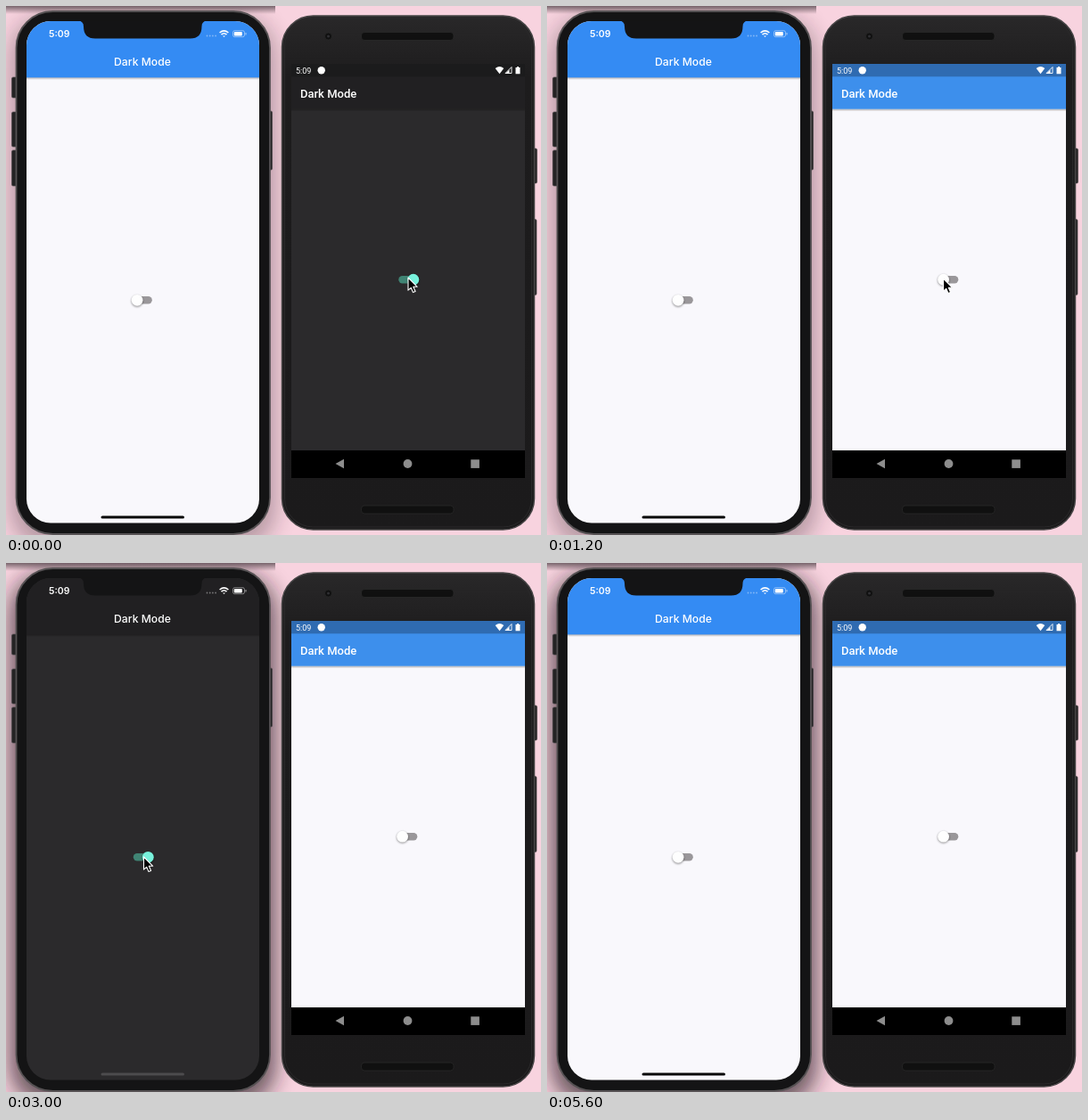
Recreate the animation shown at these times as an HTML page. Size 600 by 594 pixels, loop 5.65 s.

```html
<!DOCTYPE html>
<html>
<head>
<meta charset="utf-8">
<style>
html, body { margin: 0; width: 100%; height: 100%; overflow: hidden; background: #f8d3df; }
svg { display: block; width: 600px; height: 594px; }
.ios { font-family: Inter, Roboto, sans-serif; }
.droid { font-family: Roboto, sans-serif; }
text { fill: #fff; }
</style>
</head>
<body>
<svg viewBox="0 0 600 594">
  <defs>
    <filter id="blur" x="-30%" y="-20%" width="160%" height="140%"><feGaussianBlur stdDeviation="12"/></filter>
    <filter id="soft" x="-50%" y="-50%" width="200%" height="200%"><feGaussianBlur stdDeviation="1"/></filter>
    <linearGradient id="top" x2="0" y2="1">
      <stop stop-color="#4d3f45" stop-opacity=".75"/><stop offset="1" stop-color="#4d3f45" stop-opacity="0"/>
    </linearGradient>
    <linearGradient id="fall" x2="0" y2="1">
      <stop stop-opacity=".3"/><stop offset="1" stop-opacity="0"/>
    </linearGradient>
    <linearGradient id="shell" x2="0" y2="1">
      <stop stop-color="#292829"/><stop offset=".12" stop-color="#1d1c1d"/><stop offset="1" stop-color="#1b1a1b"/>
    </linearGradient>
    <clipPath id="leftScreen"><rect x="23" y="17" width="261" height="563.5" rx="27"/></clipPath>
  </defs>

  <rect width="600" height="594" fill="#f8d3df"/>
  <rect id="shadow" x="4" y="10" width="299" height="600" rx="46" fill="#24161c" filter="url(#blur)"/>
  <rect width="302" height="9" fill="url(#top)"/>

  <!-- left phone -->
  <g fill="#242324" stroke="#4a4648" stroke-width=".7">
    <rect x="6.5" y="80" width="7" height="23" rx="1.5"/>
    <rect x="6.5" y="119" width="7" height="39" rx="1.5"/>
    <rect x="6.5" y="162" width="7" height="40" rx="1.5"/>
    <rect x="292" y="118" width="6.5" height="66" rx="1.5"/>
  </g>
  <rect x="11.5" y="6" width="284.5" height="587" rx="41" fill="#141415" stroke="#565254" stroke-width="1.8"/>
  <g clip-path="url(#leftScreen)">
    <rect id="lBody" x="23" y="17" width="261" height="564"/>
    <rect x="23" y="80" width="261" height="3" fill="url(#fall)"/>
    <rect id="lBar" x="23" y="17" width="261" height="63.3"/>
  </g>
  <path d="M81 16.5Q87 17 87 23Q87 36.5 100 36.5H206.5Q219.5 36.5 219.5 23Q219.5 17 225.5 16.5Z" fill="#141415"/>
  <g class="ios">
    <text x="48" y="35" font-size="10.5" font-weight="600">5:09</text>
    <text x="153" y="67" font-size="12.2" font-weight="500" text-anchor="middle">Dark Mode</text>
  </g>
  <g fill="#fff" opacity=".38">
    <circle cx="225.5" cy="33.5" r=".9"/><circle cx="228.7" cy="33.5" r=".9"/>
    <circle cx="231.9" cy="33.5" r=".9"/><circle cx="235.1" cy="33.5" r=".9"/>
  </g>
  <g fill="none" stroke="#fff" stroke-width="1.6">
    <path d="M239.6 30Q244.5 25.6 249.4 30M241.5 32.1Q244.5 29.4 247.5 32.1"/>
    <path d="M243 33.4H246L244.5 35Z" fill="#fff" stroke="none"/>
    <rect x="254.5" y="27.7" width="13" height="7" rx="2" stroke-width=".8" opacity=".55"/>
    <rect x="255.8" y="29" width="9" height="4.4" rx="1" fill="#fff" stroke="none"/>
    <path d="M269 30V32.5" stroke-width="1.1" opacity=".55"/>
  </g>
  <rect id="home" x="106.5" y="572.4" width="93.5" height="3.2" rx="1.6"/>

  <!-- right phone -->
  <g fill="#282728" stroke="#3b393a" stroke-width=".6">
    <rect x="589" y="160" width="6.5" height="39" rx="1.5"/>
    <rect x="589" y="239.5" width="6" height="85" rx="1.5"/>
  </g>
  <rect x="309.5" y="11" width="283" height="577" rx="35" fill="url(#shell)" stroke="#474546" stroke-width="1.5"/>
  <rect x="312.5" y="14" width="277" height="571" rx="32" fill="none" stroke="#2a292a"/>
  <g fill="#101010" stroke="#2c2b2c" stroke-width=".7">
    <rect x="398.5" y="29.5" width="103.5" height="9" rx="3.5"/>
    <rect x="398.5" y="561" width="103.5" height="9" rx="3.5"/>
    <circle cx="361.5" cy="34" r="4"/>
  </g>
  <circle cx="361.5" cy="34" r="1.5" fill="#303033"/>
  <rect id="rBody" x="320" y="115" width="262" height="384"/>
  <rect x="320" y="115.5" width="262" height="3" fill="url(#fall)"/>
  <rect id="rBar" x="320" y="79" width="262" height="36.7"/>
  <rect id="rStatus" x="320" y="65" width="262" height="14.3"/>
  <g class="droid">
    <text x="325" y="75.8" font-size="9">5:09</text>
    <text x="330" y="102.5" font-size="13" font-weight="500">Dark Mode</text>
  </g>
  <g fill="#fff">
    <circle cx="353.7" cy="72.3" r="4.2"/>
    <path d="M548.7 70Q553.5 66.2 558.3 70L553.5 76.2Z"/>
    <path d="M560 75.5L567 68.5V75.5Z" fill="none" stroke="#fff" stroke-width=".9"/>
    <path d="M560 76L564.5 71.5V76Z"/>
    <path d="M571.5 69H573V68H575V69H576.5V76.3H571.5Z"/>
  </g>
  <rect x="320" y="499" width="262" height="31"/>
  <g fill="#8d8d8d">
    <path d="M369.5 514L379 508.8V519.2Z"/>
    <circle cx="450.5" cy="514" r="4.9"/>
    <rect x="521.3" y="509.3" width="9.6" height="9.6"/>
  </g>

  <g id="lSwitch" transform="translate(153.3 330.3)"></g>
  <g id="rSwitch" transform="translate(450.8 307.2)"></g>
  <path id="cursor" d="M0 0V14.2L3.2 11.3L5.5 16.6L8.1 15.4L5.8 10.3H10.2Z" stroke="#fff" stroke-width="1.1" stroke-linejoin="round"/>
</svg>
<script>
const LOOP = 5650;
const $ = id => document.getElementById(id);
const clamp = x => Math.max(0, Math.min(1, x));
const ramp = (t, start, length) => clamp((t - start) / length);
const smooth = x => x * x * (3 - 2 * x);
const mix = (a, b, p) => a + (b - a) * p;
const blend = (a, b, p) => `rgb(${a.map((v, i) => Math.round(mix(v, b[i], p)))})`;
const paint = (id, light, dark, p) => $(id).setAttribute('fill', blend(light, dark, p));

for (const id of ['lSwitch', 'rSwitch']) {
  $(id).innerHTML = `<rect x="-10.5" y="-4.2" width="21" height="8.4" rx="4.2"/>
    <g><circle cy="1" r="6.6" opacity=".38" filter="url(#soft)"/><circle r="6.4"/></g>`;
}

function setSwitch(id, p) {
  const [track, thumb] = $(id).children;
  track.setAttribute('fill', blend([154, 151, 154], [64, 132, 116], p));
  thumb.setAttribute('transform', `translate(${mix(-6.2, 6, smooth(p))} 0)`);
  thumb.lastChild.setAttribute('fill', blend([254, 254, 254], [120, 242, 220], p));
}

// Cursor stops: time, x, y
const path = [
  [0, 451, 305], [200, 451, 305], [450, 444.5, 306], [1250, 444.5, 306],
  [1800, 154.5, 330], [3100, 154.5, 330], [3550, 149.5, 330],
  [4900, 149.5, 330], [5300, 190, 545]
];

function cursorAt(t) {
  const i = path.findIndex(stop => stop[0] > t);
  if (i < 0) return null;
  const [a, b] = [path[i - 1], path[i]];
  const p = smooth(ramp(t, a[0], b[0] - a[0]));
  return [mix(a[1], b[1], p), mix(a[2], b[2], p)];
}

function draw(t) {
  const left = ramp(t, 2425, 200) - ramp(t, 3992, 200);
  const right = 1 - ramp(t, 530, 200);
  const body = [[249, 248, 252], [43, 42, 44]];

  paint('lBody', ...body, left);
  paint('lBar', [52, 139, 243], [33, 32, 34], left);
  paint('home', [8, 8, 8], [76, 75, 77], left);
  paint('rBody', ...body, right);
  paint('rBar', [61, 143, 236], [33, 32, 34], right);
  paint('rStatus', [47, 107, 177], [27, 27, 28], right);
  setSwitch('lSwitch', left);
  setSwitch('rSwitch', right);
  $('shadow').setAttribute('opacity', t < 2300 ? .3 : .65);

  const at = cursorAt(t);
  $('cursor').setAttribute('visibility', at ? 'visible' : 'hidden');
  if (at) $('cursor').setAttribute('transform', `translate(${at})`);
}

const start = performance.now();
function tick() {
  draw((performance.now() - start) % LOOP);
  requestAnimationFrame(tick);
}
tick();
</script>
</body>
</html>
```
